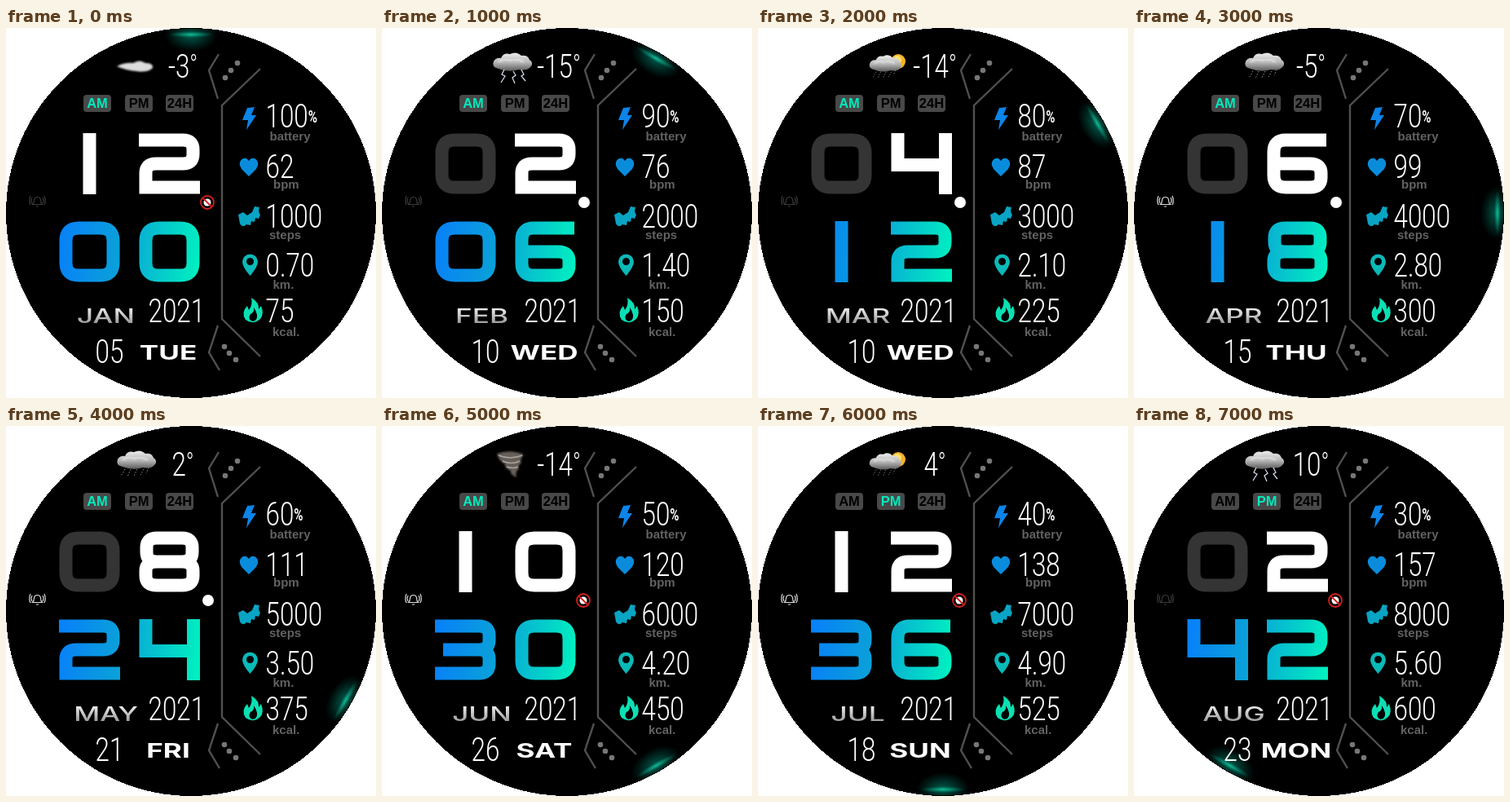
An HTML page that plays this animation: 454x454 px, repeating every 8000 ms.

```html
<!DOCTYPE html>
<html lang="en">
<head>
<meta charset="utf-8">
<title>Watch face</title>
<style>
  html, body { margin: 0; width: 100%; height: 100%; overflow: hidden; background: #fff; }
  svg { display: block; width: 454px; height: 454px; }
  .num { font: 350 41px Roboto, sans-serif; fill: #fff; }
  .unit { font: bold 15px "Liberation Sans", Arial, sans-serif; fill: #626262; }
  .mode { font: bold 16.5px "Liberation Sans", Arial, sans-serif; text-anchor: middle; }
  .wide { font-family: Inter, sans-serif; font-size: 24.7px; text-anchor: middle; }
  .line { fill: none; stroke: #505050; stroke-width: 2.4; }
  .digit { fill: none; stroke-width: 16; }
</style>
</head>
<body>
<svg viewBox="0 0 454 454">
  <defs>
    <clipPath id="face"><circle cx="227" cy="227" r="226"/></clipPath>
    <radialGradient id="glow">
      <stop stop-color="#00b898" stop-opacity=".5"/>
      <stop offset=".5" stop-color="#009a80" stop-opacity=".28"/>
      <stop offset="1" stop-color="#008070" stop-opacity="0"/>
    </radialGradient>
    <radialGradient id="streak">
      <stop stop-color="#20f0c0" stop-opacity=".65"/>
      <stop offset="1" stop-color="#00c0a0" stop-opacity="0"/>
    </radialGradient>
    <linearGradient id="tens" gradientUnits="userSpaceOnUse" x1="0" y1="20" x2="174" y2="40">
      <stop stop-color="#0880f8"/><stop offset=".45" stop-color="#0aa2d8"/><stop offset="1" stop-color="#00f0c0"/>
    </linearGradient>
    <linearGradient id="ones" href="#tens" x1="-98" x2="76"/>
    <linearGradient id="silver" x2="0" y2="1">
      <stop offset=".2" stop-color="#eee"/><stop offset=".85" stop-color="#999"/>
    </linearGradient>
    <linearGradient id="cloud" x2="0" y2="1">
      <stop stop-color="#eee"/><stop offset=".55" stop-color="#b4b4b4"/><stop offset="1" stop-color="#5a5a5a"/>
    </linearGradient>
    <filter id="soft"><feGaussianBlur stdDeviation="1.2"/></filter>
  </defs>
  <circle cx="227" cy="227" r="227" shape-rendering="crispEdges"/>
  <g clip-path="url(#face)">
    <g id="second">
      <ellipse cx="227" cy="9" rx="33" ry="20" fill="url(#glow)"/>
      <ellipse cx="227" cy="8" rx="28" ry="4" fill="url(#streak)"/>
    </g>
  </g>

  <path class="line" d="M312 50L265 95V357L312 403M261 32L249 52L260 87M260 365L249 398L262 420"/>
  <g fill="#777">
    <circle cx="284" cy="43" r="3.300"/><circle cx="276" cy="52" r="3.300"/><circle cx="269" cy="61" r="3.300"/>
    <circle cx="268" cy="391" r="3.300"/><circle cx="274" cy="399" r="3.300"/><circle cx="282" cy="407" r="3.300"/>
  </g>

  <path fill="#0c84e8" d="M296 98L305 97L301 107L307 107L295 125L297 113L290 113Z"/>
  <path fill="#0a8cdc" d="M298 182L289 173Q284 165 290 160.500Q295 158 298 163Q301 158 306 160.500Q312 165 307 173Z"/>
  <path fill="#0aa4c4" d="M285 229L291 226L296 230L302 226L305 219L311 220Q309 226 312 229L310 234L306 233L305 238L301 237L300 242L295 241Q290 246 287 240Z"/>
  <path fill="#0abab8" fill-rule="evenodd" d="M299.500 304Q290 293 290 287A9.500 9.500 0 0 1 309 287Q309 293 299.500 304ZM299.500 282a4.500 4.500 0 1 0 .1 0Z"/>
  <path fill="#0ae0b4" fill-rule="evenodd" d="M301 331Q311 337 310 345L313 341Q317 351 312 357Q303 365 294 358Q288 349 296 341L298 346Q303 340 301 331ZM304 343Q305 349 300 351Q296 357 302 360Q309 359 308 352Q307 347 304 343Z"/>
  <g class="unit">
    <text x="323.5" y="138">battery</text><text x="328" y="197">bpm</text><text x="323" y="259">steps</text>
    <text x="327.5" y="319.5">km.</text><text x="327" y="378">kcal.</text>
  </g>
  <g id="live"></g>
</svg>
<script>
const DIGITS = {
  0: 'M24 8.5H51Q66.5 8.5 66.5 24V51Q66.5 66.5 51 66.5H24Q8.5 66.5 8.5 51V24Q8.5 8.5 24 8.5Z',
  1: 'M37.5 0V75',
  2: 'M0 8.5H54Q66.5 8.5 66.5 20V26Q66.5 37.5 54 37.5H21Q8.5 37.5 8.5 49V66.5H75',
  3: 'M0 8.5H54Q66.5 8.5 66.5 20V26Q66.5 37.5 54 37.5H10H54Q66.5 37.5 66.5 49V55Q66.5 66.5 54 66.5H0',
  4: 'M8.5 0V39H67M67 0V75',
  6: 'M73 8.5H23Q8.5 8.5 8.5 23V52Q8.5 66.5 23 66.5H53Q66.5 66.5 66.5 55V49Q66.5 37.5 53 37.5H9',
  8: 'M22 8.5H53Q65.5 8.5 65.5 20V26Q65.5 37.5 53 37.5H22Q9.5 37.5 9.5 26V20Q9.5 8.5 22 8.5Z' +
     'M22 37.5H53Q66.5 37.5 66.5 49V55Q66.5 66.5 53 66.5H22Q8.5 66.5 8.5 55V49Q8.5 37.5 22 37.5Z'
};

// temperature, weather, hour, month, date, weekday, pulse, bluetooth, alarm
const STATES = [
  [-3, 'mist', '12', 'JAN', '05', 'TUE', 62, 0, 0],
  [-15, 'storm', '02', 'FEB', '10', 'WED', 76, 1, 0],
  [-14, 'sunny', '04', 'MAR', '10', 'WED', 87, 1, 0],
  [-5, 'rain', '06', 'APR', '15', 'THU', 99, 1, 1],
  [2, 'rain', '08', 'MAY', '21', 'FRI', 111, 1, 1],
  [-14, 'tornado', '10', 'JUN', '26', 'SAT', 120, 0, 1],
  [4, 'sunny', '12', 'JUL', '18', 'SUN', 138, 0, 1],
  [10, 'storm', '02', 'AUG', '23', 'MON', 157, 0, 0]
];

const CLOUD = '<path fill="url(#cloud)" d="M143 50Q134 48 137 41Q140 36 146 37Q149 30 157 32Q165 28 171 34Q179 33 181 39Q187 43 182 48Q178 53 168 51Q156 55 143 50Z"/>' +
  '<path d="M143 42Q150 36 157 40Q165 36 174 42" fill="none" stroke="#fff" stroke-width="2" opacity=".6" filter="url(#soft)"/>';
const DROPS = '<path d="M146 53L142 60M153 53L149 62M161 53L157 61M169 53L165 60M175 51L172 58" stroke="#999" stroke-dasharray="1.500 2"/>';
const WEATHER = {
  mist: '<path d="M136 47Q146 42 156 43Q164 38 171 43Q181 43 180 49Q174 55 160 53Q147 52 136 47Z" fill="#ddd" filter="url(#soft)"/>',
  rain: CLOUD + DROPS,
  storm: CLOUD + '<path d="M150 51L147 57L151 59L146 67M161 53L164 58L160 61L163 68M171 51L174 57L171 59L176 65" fill="none" stroke="#dde4f5" stroke-width="1.200"/>',
  sunny: '<circle cx="172" cy="41" r="9" fill="#f5b429"/><circle cx="171" cy="39" r="5" fill="#ffe06a"/>' +
    `<g transform="translate(25 6) scale(.82 .9)">${CLOUD}${DROPS}</g>`,
  tornado: '<path d="M141 34Q157 28 174 35Q169 41 171 45Q166 49 168 53Q163 55 165 63Q157 60 158 55Q150 52 151 47Q144 44 141 34Z" fill="#665f5a" filter="url(#soft)"/>' +
    '<path d="M143 36Q157 42 172 36M148 43Q159 48 169 43M153 50Q161 53 167 50" fill="none" stroke="#aaa39c" stroke-width="1.500"/>'
};

const num = (x, y, text, anchor = 'start') =>
  `<text class="num" text-anchor="${anchor}" transform="translate(${x} ${y}) scale(.765 1)">${text}</text>`;
const wide = (x, y, text, weight, fill) =>
  `<text class="wide" font-weight="${weight}" fill="${fill}" transform="translate(${x} ${y}) scale(1.42 1)">${text}</text>`;
const digit = (x, y, d, stroke) =>
  `<path class="digit" stroke="${stroke}" transform="translate(${x} ${y})" d="${DIGITS[d]}"/>`;
const mode = (x, text, on) =>
  `<rect x="${x}" y="82" width="34" height="21" rx="4" fill="#484848"/>
   <text class="mode" x="${x + 17}" y="98" fill="${on ? '#00eabc' : '#000'}">${text}</text>`;

const bell = on => `<g fill="none" stroke="${on ? '#ddd' : '#3a3a3a'}" stroke-width="1.200">
  <path d="M32.500 216.500Q34.500 215 34.500 211Q35 207.500 38.500 207.500Q42 207.500 42.500 211Q42.500 215 44.500 216.500ZM37 219H40M32 208Q30 212 32 215M45 208Q47 212 45 215M30 206Q27.500 212 30 217M47 206Q49.500 212 47 217"/></g>`;
const radio = on => on
  ? '<circle cx="248" cy="214" r="7" fill="#fff"/>'
  : `<circle cx="247" cy="214" r="4.500" fill="#fff"/>
     <path d="M241.500 208.500L252.500 219.500M255 214a8 8 0 1 1 -16 0a8 8 0 1 1 16 0" fill="none" stroke="#d3201c" stroke-width="1.800"/>`;

function render(i) {
  const [temp, weather, hour, month, date, day, pulse, bluetooth, alarm] = STATES[i];
  const minute = String(i * 6).padStart(2, '0');
  const pm = i > 5;
  const percent = '<tspan font-size="20" font-weight="600" dy="-6">%</tspan>';
  const degree = '<tspan font-size="34" font-weight="300" dy="-5">°</tspan>';
  document.getElementById('second').setAttribute('transform', `rotate(${i * 30} 227 227)`);
  document.getElementById('live').innerHTML = [
    WEATHER[weather],
    num(217, 61, temp + degree, 'middle'),
    mode(95, 'AM', !pm), mode(146, 'PM', pm), mode(196, '24H', false),
    digit(65, 129, hour[0], hour[0] === '0' ? '#343434' : '#fff'),
    digit(163, 129, hour[1], '#fff'),
    digit(65, 237, minute[0], 'url(#tens)'),
    digit(163, 237, minute[1], 'url(#ones)'),
    bell(alarm), radio(bluetooth),
    wide(122.5, 361.5, month, 500, 'url(#silver)'), num(174.5, 361, 2021),
    num(109.5, 411, date), wide(199, 407, day, 700, '#fff'),
    num(318.5, 122, 100 - i * 10 + percent),
    num(318.5, 184, pulse),
    num(318.5, 245, (i + 1) * 1000),
    num(318.5, 305, ((i + 1) * 0.7).toFixed(2)),
    num(318.5, 361, (i + 1) * 75)
  ].join('');
}

let shown = -1;
const start = performance.now();
function tick() {
  const i = Math.floor((performance.now() - start) / 1000) % STATES.length;
  if (i !== shown) render(shown = i);
  requestAnimationFrame(tick);
}
tick();
</script>
</body>
</html>
```
